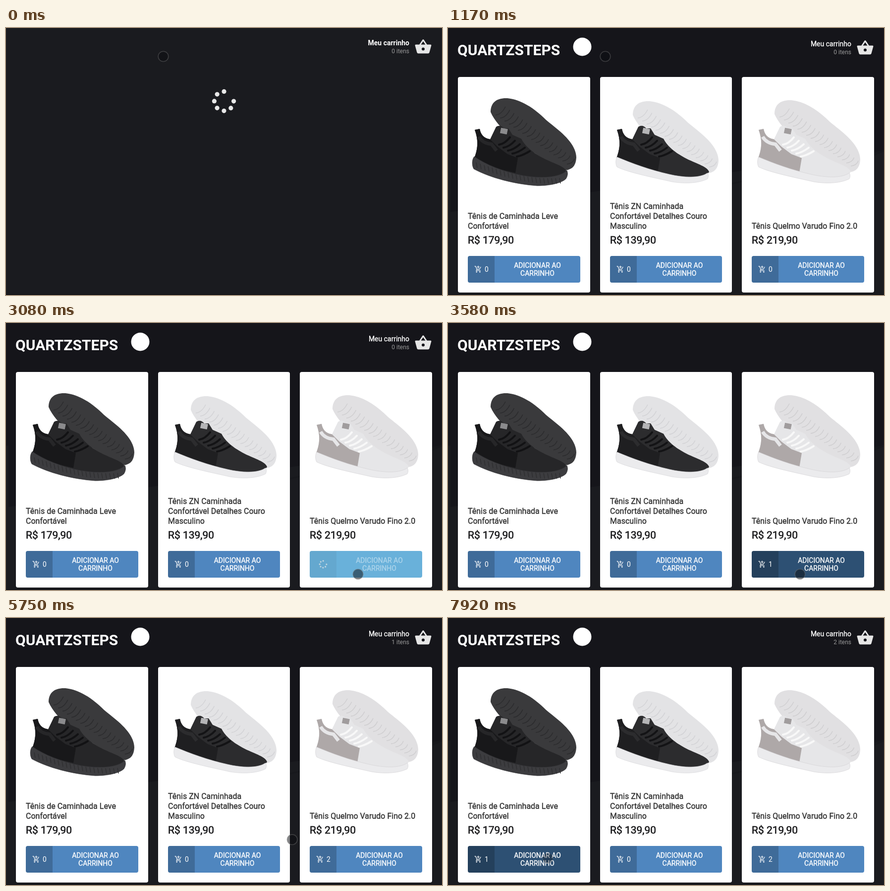
Animation of 880x540 px, one loop 8000 ms. Source, as an HTML page:

```html
<!DOCTYPE html>
<html lang="pt-BR">
<head>
<meta charset="utf-8">
<title>Loja de tênis</title>
<style>
  html, body { margin: 0; width: 100%; height: 100%; overflow: hidden; background: #1a1b1f; }
  svg { display: block; width: 880px; height: 540px; font-family: Roboto, "Liberation Sans", sans-serif; }
  .logo { font-size: 30px; font-weight: 700; fill: #fff; }
  .cart { font-size: 14px; fill: #fff; stroke: #fff; stroke-width: .3; }
  .cart.bold { font-weight: 700; stroke: none; }
  .items { font-size: 12px; fill: #999; }
  .title { font-size: 16px; fill: #333; stroke: #333; stroke-width: .4; }
  .price { font-size: 21px; fill: #1b1b1d; stroke: #1b1b1d; stroke-width: .6; }
  .label { font-size: 14px; fill: #fff; stroke: #fff; stroke-width: .35; text-anchor: middle; }
  .count { font-size: 14px; fill: #fff; }
  .end { text-anchor: end; }
</style>
</head>
<body>
<svg viewBox="0 0 880 540">
  <defs>
    <g id="dots" fill="#e8e8e8"></g>
    <g id="add" fill="none" stroke="#fff" stroke-width="2">
      <path d="M1 3H4L8 12H15.5L20 4.5M8 12L6 16H19M12 1V9M8 5H16"/>
      <circle cx="7" cy="20" r="1"/><circle cx="17" cy="20" r="1"/>
    </g>
  </defs>

  <g id="backdrop">
    <rect width="880" height="540" fill="#15151a"/>
    <path d="M0 248H5V372L880 248V540H0Z" fill="#1a1b1f"/>
    <path d="M880 248L310 372M880 248L600 372" stroke="#17181c" stroke-width="3"/>
  </g>
  <rect y="538" width="880" height="2" fill="#141418"/>

  <g id="brand">
    <text class="logo" x="19" y="55">QUARTZSTEPS</text>
    <circle cx="271" cy="38" r="18.5" fill="#fff"/>
  </g>

  <g id="header">
    <g id="info">
      <text id="cart" class="cart end" x="814" y="37">Meu carrinho</text>
      <text id="items" class="items end" x="814" y="53"></text>
    </g>
    <g id="basket" transform="translate(824 22) scale(1.5)" fill="#e6e6e6">
      <path fill-rule="evenodd" d="M17.2 9L12.8 2.4Q12 1.6 11.2 2.4L6.8 9H2Q1 9 1 10L3.6 19.5Q4 21 5.5 21H18.5Q20 21 20.4 19.5L23 10Q23 9 22 9ZM9 9L12 4.6L15 9ZM12 17A2 2 0 0 1 12 13A2 2 0 0 1 12 17Z"/>
    </g>
  </g>

  <use id="loader" href="#dots"/>
  <g id="cards"></g>
  <circle id="cursor" r="10.3" fill="#0a0c10" fill-opacity=".5" stroke="#777" stroke-opacity=".4" stroke-width="1.6"/>
</svg>

<script>
const LOOP = 8000, READY = 165, LIST = 1160, WAIT = 410;
const $ = id => document.getElementById(id);
const clamp = v => Math.max(0, Math.min(1, v));
const span = (t, a, b) => clamp((t - a) / (b - a));
const lerp = (a, b, u) => a + (b - a) * u;
const smooth = u => u * u * (3 - 2 * u);
const mix = (a, b, u) => `rgb(${a.map((v, i) => Math.round(lerp(v, b[i], u)))})`;
const rgb = c => `rgb(${c})`;

const BLUE = [79, 134, 191], DARK = [45, 80, 115], LIGHT = [105, 177, 218], GREY = [131, 142, 147];

// Midsole outlines
const THICK = "M53 260C48 266 48 278 52 285C85 303 135 316 180 319C208 319 230 313 238 305C242 299 242 293 240 288C226 302 190 305 150 298C110 290 78 277 53 260Z";
const SLIM = "M54 261C51 266 51 276 54 281C75 292 130 303 165 311C195 316 222 313 237 305C239 301 239 297 237 293C222 304 190 303 160 296C120 287 85 274 54 261Z";

const products = [
  { x: 20, w: 267, title: ["Tênis de Caminhada Leve", "Confortável"], price: "179,90", clicks: [6660],
    sole: THICK, drop: 0, back: "#3a3a3c", groove: "#2c2c2e", upper: "#262628", heel: "#18181a", mid: "#3c3c3f", edge: "#2f2f31", lace: "#121214", tag: "#8b8b8d" },
  { x: 307, w: 266, title: ["Tênis ZN Caminhada", "Confortável Detalhes Couro", "Masculino"], price: "139,90", clicks: [],
    sole: SLIM, drop: 6, back: "#e3e3e5", groove: "#d3d3d6", upper: "#2c2c2e", heel: "#1f1f21", mid: "#ebebed", edge: "#d6d6d8", lace: "#131315", tag: "#b5b5b7" },
  { x: 593, w: 267, title: ["Tênis Quelmo Varudo Fino 2.0"], price: "219,90", clicks: [3070, 4740],
    sole: SLIM, drop: 4, back: "#e1e0e2", groove: "#d0cfd1", upper: "#e6e6e8", heel: "#aea8a8", mid: "#ebebed", edge: "#d3d2d4", lace: "#f8f8f8", tag: "#a09c9d" }
];

// Drawn in the coordinates of the first card
function shoe(p) {
  let grooves = "", laces = "", ribs = "";
  for (let i = 0; i < 17; i++) {
    grooves += `M${96 + i * 9} ${176 + i * 6.2}q12 -1 ${20 - i * .3} ${-17 + i * .4}`;
  }
  for (let i = 0; i < 5; i++) laces += `M${103 + i * 9} ${236 + i * 6}q12 -2 ${22 + i} ${-15 + i}`;
  if (p.sole === THICK) {
    for (let i = 0; i < 22; i++) ribs += `M${57 + i * 8} ${272 + 32 * Math.sin(i / 21 * 1.75)}l2 11`;
  }
  return `
    <g transform="translate(0 ${p.drop})">
      <path d="M86 170C86 150 99 141 120 142C148 145 174 162 198 186C222 206 258 230 259 262C258 280 250 286 236 288C222 288 210 278 198 268C165 246 104 212 86 170Z" fill="${p.back}"/>
      <path d="${grooves}" fill="none" stroke="${p.groove}" stroke-width="1.6"/>
    </g>
    <path d="M54 206L64 204C66 215 72 223 85 225L97 200C103 196 109 198 113 203L122 203L130 216L148 224C156 240 172 252 190 262C212 274 236 279 240 291C230 306 190 309 150 303C110 295 80 281 53 263C60 245 62 228 54 206Z" fill="${p.upper}"/>
    <path d="M54 206L64 204C66 215 72 223 85 225L100 240L120 255L141 263L136 293C106 287 78 278 53 263C60 245 62 228 54 206Z" fill="${p.heel}"/>
    <path d="M62 220C68 230 76 234 88 235L98 248" fill="none" stroke="${p.upper}" stroke-width="7"/>
    <path d="${p.sole}" fill="${p.mid}" stroke="${p.edge}" stroke-width=".7"/>
    <path d="${ribs}" stroke="${p.edge}" stroke-width="1.5"/>
    <path d="${laces}" fill="none" stroke="${p.lace}" stroke-width="4" stroke-linecap="round"/>
    <rect x="106" y="203" width="14" height="11" fill="${p.tag}" transform="rotate(12 113 208)"/>`;
}

function card(p) {
  const last = p.title.length - 1;
  const lines = p.title.map((s, i) => `<text class="title" x="20" y="${406 - 20 * (last - i)}">${s}</text>`).join("");
  const mid = (74 + p.w - 20) / 2;
  return `<g transform="translate(${p.x} 0)">
    <rect y="99" width="${p.w}" height="436" rx="4" fill="#fff"/>
    <g transform="translate(-20 0)">${shoe(p)}</g>
    ${lines}
    <text class="price" x="20" y="436">R$ ${p.price}</text>
    <rect class="face" x="20" y="461" width="${p.w - 40}" height="54" rx="4"/>
    <path class="side" d="M74 461H24Q20 461 20 465V511Q20 515 24 515H74Z"/>
    <g class="tally">
      <use href="#add" transform="translate(33 480) scale(.667)" opacity=".9"/>
      <text class="count" x="54" y="493"></text>
    </g>
    <use class="spin" href="#dots"/>
    <g class="text">
      <text class="label" x="${mid}" y="485">ADICIONAR AO</text>
      <text class="label" x="${mid}" y="501">CARRINHO</text>
    </g>
  </g>`;
}

// Ring of eight dots with the upper right one missing
for (let i = 0; i < 7; i++) {
  const a = i * Math.PI / 4;
  $("dots").innerHTML += `<circle cx="${19.6 * Math.cos(a)}" cy="${19.6 * Math.sin(a)}" r="4.6"/>`;
}
$("cards").innerHTML = products.map(card).join("");
[...$("cards").children].forEach((el, i) => {
  const p = products[i];
  for (const k of ["face", "side", "tally", "count", "spin", "text"]) p[k] = el.querySelector("." + k);
});

const turn = ms => ms * 128 / 1080;

function drawButton(p, t) {
  const past = p.clicks.filter(c => t >= c);
  const age = past.length ? t - past[past.length - 1] : Infinity;
  const busy = age < WAIT;
  const count = past.length - (busy ? 1 : 0);
  const u = span(age, 20, 160);
  p.face.setAttribute("fill", busy ? mix(LIGHT, GREY, u) : rgb(count === 1 ? DARK : BLUE));
  p.side.setAttribute("fill-opacity", busy ? .05 : .2);
  p.text.setAttribute("opacity", busy ? lerp(.45, 1, u) : 1);
  p.tally.setAttribute("visibility", busy ? "hidden" : "inherit");
  p.spin.setAttribute("visibility", busy ? "inherit" : "hidden");
  p.count.textContent = count;
  if (busy) {
    p.spin.setAttribute("transform", `translate(47 488) scale(.35) rotate(${turn(age)})`);
    p.spin.setAttribute("opacity", lerp(.7, 1, u));
  }
}

function drawHeader(t) {
  const ready = t >= READY;
  const added = [3480, 7070].filter(h => t >= h);
  const age = added.length ? t - added[added.length - 1] : Infinity;
  const fade = d => 1 - (1 - span(age, 110, 110 + d)) ** 2;
  $("header").setAttribute("transform", `translate(0 ${ready ? 0 : -2})`);
  $("cart").setAttribute("class", ready ? "cart end" : "cart bold end");
  $("items").textContent = added.length + " itens";
  $("info").setAttribute("opacity", fade(720));
  $("basket").setAttribute("opacity", fade(250));
}

function cursorAt(t) {
  if (t < 1750) {
    const u = span(t, 1670, 1750);
    return [lerp(317.5, 363.5, u), lerp(57.5, 87.5, u)];
  }
  if (t < 5500) {
    const u = span(t, 1750, 2500);
    return [lerp(363.5, 710.5, 1 - (1 - u) ** 1.4), lerp(87.5, 508, smooth(u))];
  }
  const u = smooth(span(t, 5500, 6250));
  return [lerp(710.5, 201.5, u), lerp(508, 486, u) - 74 * Math.sin(Math.PI * u)];
}

function draw(t) {
  const ready = t >= READY, listed = t >= LIST;
  const show = (id, on) => $(id).setAttribute("visibility", on ? "visible" : "hidden");
  show("backdrop", ready);
  show("brand", ready);
  show("loader", !listed);
  show("cards", listed);
  $("loader").setAttribute("transform", `translate(440 ${ready ? 151 : 148}) rotate(${turn(t)})`);
  drawHeader(t);
  products.forEach(p => drawButton(p, t));
  const [x, y] = cursorAt(t);
  $("cursor").setAttribute("cx", x);
  $("cursor").setAttribute("cy", y);
  $("cursor").setAttribute("opacity", lerp(1, .6, span(t, 6900, 7300)));
}

const start = performance.now();
function tick() {
  draw((performance.now() - start) % LOOP);
  requestAnimationFrame(tick);
}
tick();
</script>
</body>
</html>
```
